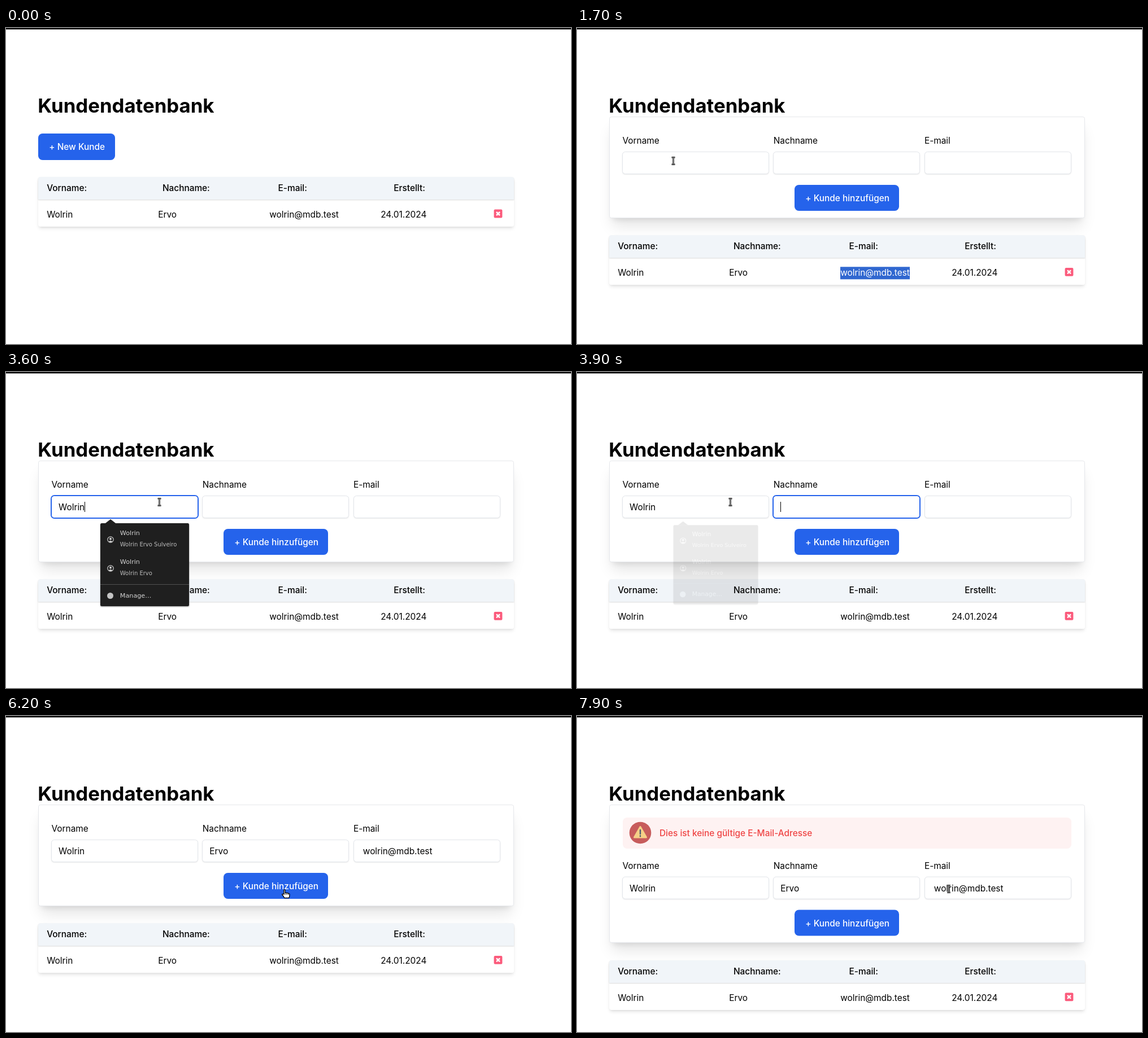
Recreate the animation shown at these times as an HTML page. Size 1000 by 560 pixels, loop 8 s.

```html
<!DOCTYPE html>
<html lang="de">
<head>
<meta charset="utf-8">
<title>Kundendatenbank</title>
<style>
html, body { margin: 0; width: 100%; height: 100%; overflow: hidden; background: #fff; }
#stage { position: relative; width: 1000px; height: 560px; overflow: hidden; color: #000;
  font: 15.4px Inter, sans-serif; font-optical-sizing: none; }
#stage div, #stage svg { position: absolute; box-sizing: border-box; overflow: visible; }
.text { line-height: 0; white-space: pre; margin-top: .8px; }
.medium { font-weight: 500; }
.title { font-size: 34.75px; font-weight: 700; margin-top: 0; }
.bar { background: linear-gradient(#000 2px, #888 2px); }
.button { background: #2563eb; color: #fff; border-radius: 7.7px; font-weight: 500; }
.card { background: #fff; border: 1px solid #e5e7eb; border-radius: 3.8px;
  box-shadow: 0 19px 24px -5px #0000001a, 0 8px 10px -6px #0000001a; }
.field { background: #fff; border: 1px solid #e2e5ea; border-radius: 5.5px; box-shadow: 0 1px 2px #00000014; }
.field.focus { border-color: #2563eb; box-shadow: 0 0 0 1px #2563eb; }
.caret { position: absolute; top: -9.5px; width: 1px; height: 18px; background: #000; }
.table { background: #fff; border-radius: 3.8px; box-shadow: 0 4px 6px -1px #0000001a, 0 2px 4px -2px #0000001a; }
.head { background: #f1f5f9; border-radius: 3.8px 3.8px 0 0; box-shadow: 0 1px 2px #00000026; }
.selection { background: #3067d0; color: #fff; line-height: 22.5px; white-space: pre; }
.alert { background: #fef2f2; border-radius: 7.5px; }
.red { color: #ef4444; }
.menu { background: #1f1f1f; border-radius: 2.5px; filter: drop-shadow(0 1px 1px #0006);
  font-family: "DejaVu Sans", sans-serif; }
.menu .text { margin-top: 0; }
.tip { border: solid transparent; border-width: 0 9px 7px; border-bottom-color: #1f1f1f; }
.rule { background: #515151; }
.name { font-size: 11.2px; color: #d4d4d4; }
.detail { font-size: 10px; color: #bcbcbc; }
.dot { background: #c4c4c4; border-radius: 50%; }
</style>
</head>
<body>
<div id="stage"></div>
<script>
const stage = document.getElementById('stage');
const FIRST = 'Wolrin', LAST = 'Ervo', MAIL = 'wolrin@mdb.test';
const LOOP = 8000, STEP = 100;
const OPEN_SHIFT = 103.3, ALERT_SHIFT = 65.6;

function box(parent, x, y, w, h, cls = '') {
  const el = document.createElement('div');
  el.className = cls;
  el.style.cssText = `left:${x}px;top:${y}px;width:${w}px;height:${h}px`;
  return parent.appendChild(el);
}

// y is the middle of the capital letters
function text(parent, x, y, str, cls = '') {
  const el = document.createElement('div');
  el.className = 'text ' + cls;
  el.style.cssText = `left:${x}px;top:${y}px`;
  el.textContent = str;
  return parent.appendChild(el);
}

function art(parent, x, y, markup) {
  parent.insertAdjacentHTML('beforeend',
    `<svg width="1" height="1" style="left:${x}px;top:${y}px" stroke-linejoin="round">${markup}</svg>`);
  return parent.lastElementChild;
}

function button(parent, x, y, w, label) {
  const el = box(parent, x, y, w, 46.4, 'button');
  text(el, 19.3, 23.2, label);
  return el;
}

const show = (el, on) => { el.style.visibility = on ? 'visible' : 'hidden'; };
const moveY = (el, y) => { el.style.transform = `translateY(${y}px)`; };

box(stage, 0, 0, 1000, 3, 'bar');
text(stage, 56.2, 137.4, 'Kundendatenbank', 'title');
const newButton = button(stage, 57, 187.3, 136.3, '+ New Kunde');

// Form
const form = box(stage, 0, 0, 0, 0);
const card = box(form, 57, 156.6, 841.5, 180, 'card');
const alertBox = box(form, 80.5, 180, 794.5, 54.6, 'alert');
art(alertBox, 31.4, 27.3, `<circle r="19.3" fill="#c75c5c"/>
  <path d="M0-10.5 10.5 8H-10.5Z" fill="#f5cf87" stroke="#f5cf87" stroke-width="3"/>
  <path d="M0-5V2M0 5.2V6.2" stroke="#4f5d73" stroke-width="2.4" stroke-linecap="round"/>`);
text(alertBox, 65.5, 27.3, 'Dies ist keine gültige E-Mail-Adresse', 'medium red');

const inputs = box(form, 0, 0, 0, 0);
const fields = ['Vorname', 'Nachname', 'E-mail'].map((label, i) => {
  const x = 80.2 + i * 267.2;
  text(inputs, x + .3, 199.3, label);
  const frame = box(inputs, x, 219, 260, 40.4, 'field');
  const line = text(inputs, x + 12.9, 239.2, '');
  const value = line.appendChild(document.createElement('span'));
  const caret = line.appendChild(document.createElement('span'));
  caret.className = 'caret';
  return { frame, value, caret };
});
button(inputs, 385, 277.9, 185.3, '+ Kunde hinzufügen');

// Table
const table = box(stage, 0, 0, 0, 0);
box(table, 57, 264, 842, 88, 'table');
box(table, 57, 264, 842, 39.5, 'head');
['Vorname:', 'Nachname:', 'E-mail:', 'Erstellt:'].forEach((label, i) =>
  text(table, 72.2 + i * 204.7, 283.4, label, 'medium'));
[FIRST, LAST, MAIL, '24.01.2024'].forEach((label, i) =>
  text(table, 72.2 + i * 197, 330.7, label));
const selection = text(table, 466.2, 319.8, MAIL);
selection.className = 'selection';
art(table, 871.2, 329.3, `<rect x="-7.4" y="-7.4" width="14.8" height="14.8" rx="2" fill="#fb5b7c"/>
  <path d="M-3-3 3 3M3-3-3 3" stroke="#fff" stroke-width="2.6"/>`);

// Autofill menus
function menu(x, w, entries) {
  const ruleY = entries.length * 50.8 + 7.3;
  const el = box(stage, x, 268, w, ruleY + 38.5, 'menu');
  box(el, 8.5, -6.8, 18, 7, 'tip');
  entries.forEach(([name, detail], i) => {
    const y = 18.3 + i * 50.8;
    art(el, 17.5, y + 10.7, `<circle r="5.2" fill="none" stroke="#d0d0d0" stroke-width="1.2"/>
      <circle cy="-1.3" r="2" fill="#d0d0d0"/><path d="M-3.6 3.8Q0 .2 3.6 3.8Q0 6.4-3.6 3.8" fill="#d0d0d0"/>`);
    text(el, 34.8, y, name, 'name');
    text(el, 34.8, y + 20, detail, 'detail');
  });
  box(el, 0, ruleY - .5, w, 1, 'rule');
  box(el, 11.8, ruleY + 14, 11.4, 11.4, 'dot');
  text(el, 34.8, ruleY + 19.7, 'Manage…', 'name');
  return el;
}
const firstMenu = menu(167, 157.4, [[FIRST, `${FIRST} ${LAST} Sulveiro`], [FIRST, `${FIRST} ${LAST}`]]);
const lastMenu = menu(434.8, 218.7, [[LAST, 'wolrin.ervo.sulveiro@mail.test']]);

// Pointers
const beam = 'M-3-6.3H-1L0-5.3 1-6.3H3M0-5.3V5.3M-3 6.3H-1L0 5.3 1 6.3H3';
const pointers = {
  arrow: art(stage, 0, 0, '<path d="M0 0V14L3.3 11 5.5 16 8 15 5.8 10H10Z" fill="#fff" stroke="#000"/>'),
  beam: art(stage, 0, 0, `<path d="${beam}" fill="none" stroke="#000" stroke-width="2.5"/>
    <path d="${beam}" fill="none" stroke="#fff" stroke-width=".7"/>`),
  hand: art(stage, 0, 0, `<path d="M-3.2 1V-6.2Q-3.2-7.4-2-7.4T-.9-6.2V-1.6Q4-2 6.8.2V4Q6.8 6 5.6 7.4H-2.2
    Q-3.2 5-6.2 1.8-6.6.4-5 .3Z" fill="#fff" stroke="#000" stroke-width="1.3"/>
    <path d="M-.9-1.5V2M1.8-1.4V2M4.4-.8V2" stroke="#000" stroke-width=".9"/>`),
};
// step, x, y, pointer used from there on
const path = [
  [2, 625, 334, 'arrow'], [4, 592, 331, 'beam'], [6, 460, 329, 'beam'], [7, 390, 318, 'arrow'],
  [9, 239, 296, 'arrow'], [10, 239, 296, 'arrow'], [13, 165, 220, 'hand'], [14, 160, 217, 'hand'],
  [15, 163, 225, 'beam'], [17, 170.5, 235.5, 'beam'], [20, 171, 237, 'beam'], [24, 180, 242, 'beam'],
  [25, 180, 242, 'beam'], [26, 271.5, 230.5, 'beam'], [56, 271.5, 230.5, 'beam'], [58, 350, 262, 'arrow'],
  [60, 480, 310, 'hand'], [61, 495, 315, 'hand'], [65, 495, 315, 'hand'], [67, 482, 307, 'beam'],
  [72, 769, 293, 'beam'], [74, 718, 293, 'beam'], [77, 658.5, 306.5, 'beam'], [79, 658, 306.5, 'beam'],
];

function drawPointer(s) {
  const i = path.findLastIndex(key => key[0] <= s);
  const [t0, x0, y0, kind] = path[i] || [0, 0, 0, ''];
  const [t1, x1, y1] = path[i + 1] || [s + 1, x0, y0];
  const k = (s - t0) / (t1 - t0);
  for (const name in pointers) {
    show(pointers[name], name === kind);
    pointers[name].style.transform = `translate(${x0 + (x1 - x0) * k}px,${y0 + (y1 - y0) * k}px)`;
  }
}

const typed = (word, steps, s) => word.slice(0, steps.filter(t => t <= s).length);

// Opacity of a menu that appears and closes at the given steps
function drawMenu(el, s, opens, closes) {
  const fadeIn = [.45, 1][s - opens] ?? (s > opens ? 1 : 0);
  const fadeOut = [.83, .085][s - closes] ?? (s > closes ? 0 : 1);
  el.style.opacity = fadeIn * fadeOut;
  el.style.transform = s > closes ? 'scale(.955)' : 'none';
}

function draw(s) {
  const open = s >= 14, invalid = s >= 63;
  const shift = invalid ? ALERT_SHIFT : 0;
  show(newButton, !open);
  form.style.display = open ? 'block' : 'none';
  show(alertBox, invalid);
  card.style.height = 180 + shift + 'px';
  moveY(inputs, shift);
  moveY(table, open ? OPEN_SHIFT + shift : 0);

  show(selection, s >= 5 && s < 20);
  selection.style.clipPath = s === 5 ? 'inset(0 0 0 50%)' : 'none';

  const focus = s < 20 ? -1 : s < 38 ? 0 : s < 48 ? 1 : s < 62 ? 2 : -1;
  const blinkOff = (s >= 24 && s < 29) || s >= 57;
  const values = [
    typed(FIRST, [31, 32, 34, 35, 36, 36], s),
    typed(LAST, [41, 43, 45, 46], s),
    s >= 51 ? ' ' + MAIL : '',
  ];
  fields.forEach(({ frame, value, caret }, i) => {
    frame.classList.toggle('focus', i === focus);
    value.textContent = values[i];
    caret.style.opacity = i === focus && !blinkOff ? 1 : 0;
  });

  drawMenu(firstMenu, s, 21, 38);
  drawMenu(lastMenu, s, 40, 48);
  drawPointer(s);
}

const start = performance.now();
let last = -1;
function tick() {
  const s = Math.floor((performance.now() - start) % LOOP / STEP);
  if (s !== last) draw(last = s);
  requestAnimationFrame(tick);
}
tick();
</script>
</body>
</html>
```
